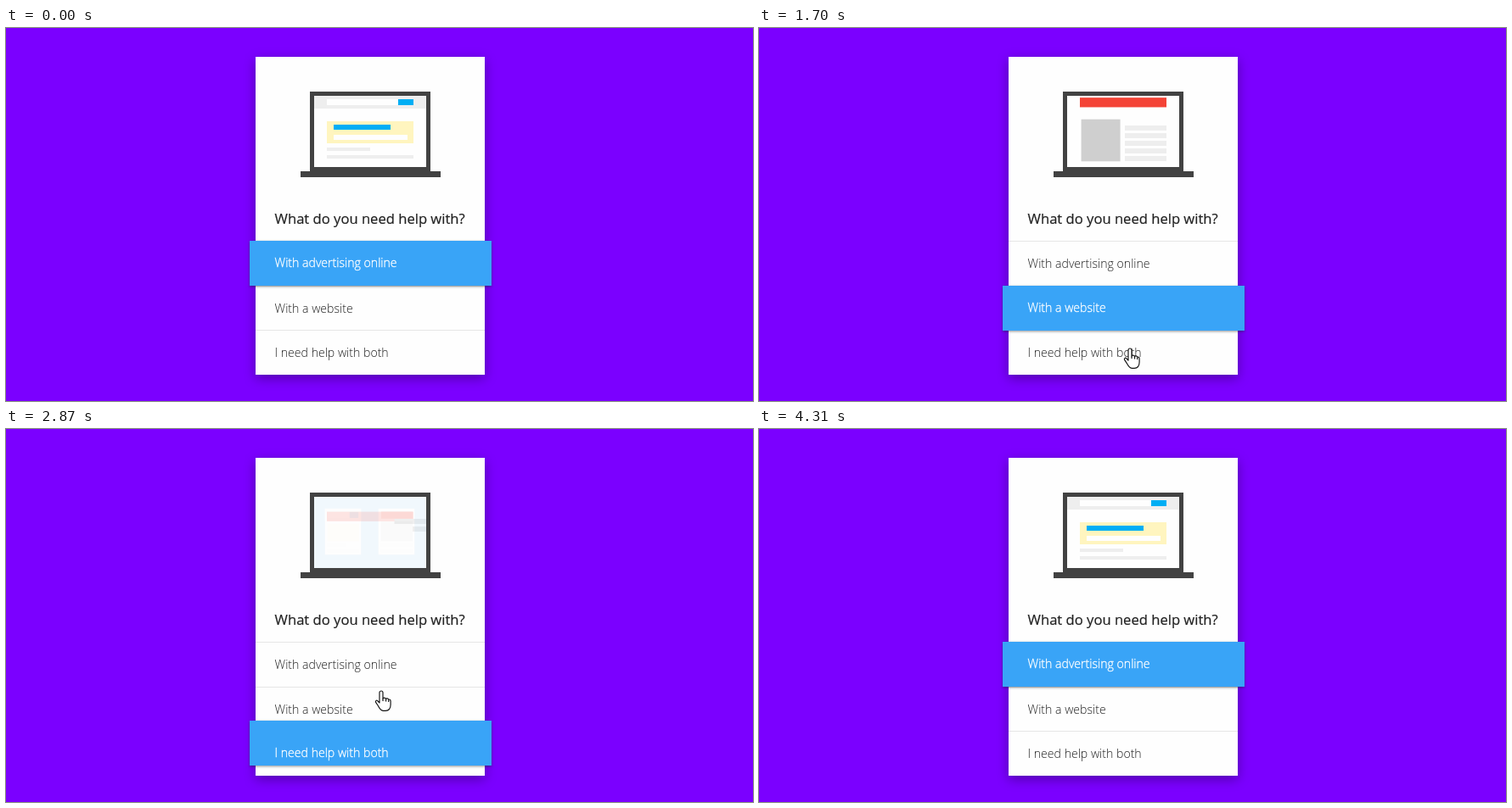
These frames come from a looping animation (880x440 px, 4960 ms). An HTML page:

```html
<!DOCTYPE html>
<html lang="en">
<head>
<meta charset="utf-8">
<title>What do you need help with?</title>
<style>
  html, body { margin: 0; width: 100%; height: 100%; overflow: hidden; background: #7b00ff; }
  svg { display: block; width: 880px; height: 440px; }
  text { font-family: "Open Sans", sans-serif; }
  .title { font-size: 16.6px; fill: #222; stroke: #222; stroke-width: .2; }
  .label { font-size: 14.1px; font-weight: 300; }
  .card { filter: drop-shadow(0 4px 7px rgba(0, 0, 0, .34)); }
  .mark { filter: drop-shadow(0 1.5px 1.5px rgba(0, 0, 0, .42)); }
</style>
</head>
<body>
<svg id="stage" viewBox="0 0 880 440">
  <defs><clipPath id="screen"><rect x="363" y="80" width="132" height="84"/></clipPath></defs>
  <rect width="880" height="440" fill="#7b00ff"/>
  <rect class="card" x="294" y="34" width="270" height="375" fill="#fefefe"/>
  <path d="M358 75h142v94h12v7H347v-7h11z" fill="#424242"/>
  <rect x="363" y="80" width="132" height="84" fill="#fefefe"/>
  <g id="view" clip-path="url(#screen)"></g>
  <text class="title" x="316.6" y="231">What do you need help with?</text>
  <path d="M294 251.5h270M294 304.5h270M294 356.5h270" stroke="#e6e6e6"/>
  <rect id="mark" class="mark" x="287" width="285" height="53" fill="#39a4f7"/>
  <g id="labels"></g>
  <g id="hand" stroke="#111" stroke-width="1.15" stroke-linejoin="round">
    <path fill="#fff" d="M-2 2a2 2 0 0 1 4 0V9c.4-1.4 3.4-1.2 3.6.6c.5-1.2 3-1 3.1.9c.8-1 2.4-.4 2.4 1.4V16c0 4.4-2.3 7.3-6 7.3H2.2c-3 0-4.4-2.8-6-6L-6.4 13.4c-.8-1.8 1-3 2.3-1.6L-2 14z"/>
    <path fill="none" d="M2 9v3M5.6 10v2.5M8.7 11v2"/>
  </g>
</svg>
<script>
const LOOP = 4960;
const GRAY = '#eee', BLUE = '#00aef4', RED = '#f44336', YELLOW = '#fff5bf', WHITE = '#fefefe';
const $ = id => document.getElementById(id);

function el(parent, tag, attrs) {
  const node = document.createElementNS('http://www.w3.org/2000/svg', tag);
  for (const k in attrs) node.setAttribute(k, attrs[k]);
  return parent.appendChild(node);
}
const group = parent => el(parent, 'g', {});
// Box given by its left, top, right and bottom edges.
const box = (parent, fill, l, t, r, b) =>
  el(parent, 'rect', { x: l, y: t, width: r - l, height: b - t, fill });
const clamp = v => Math.max(0, Math.min(1, v));
const span = (t, start, dur) => clamp((t - start) / dur);
const rest = u => (1 - u) ** 3;
const backOut = u => 1 + 2.70158 * (u - 1) ** 3 + 1.70158 * (u - 1) ** 2;
const smooth = u => u * u * (3 - 2 * u);
const move = (g, x, y) => g.setAttribute('transform', `translate(${x.toFixed(2)} ${y.toFixed(2)})`);
const zoom = (g, x, y, s) =>
  g.setAttribute('transform', `translate(${x} ${y}) scale(${s.toFixed(4)}) translate(${-x} ${-y})`);
const fade = (g, a) => g.setAttribute('opacity', clamp(a).toFixed(3));

// Advertising page
const ad = group($('view'));
const adHead = group(ad), adBox = group(ad), adLines = group(ad);
box(adHead, GRAY, 363, 80, 495, 95);
box(adHead, WHITE, 378, 84, 462, 91);
box(adHead, BLUE, 462, 84, 480, 91);
box(adBox, YELLOW, 378, 110, 480, 136);
box(adBox, BLUE, 386, 114, 453, 120);
box(adBox, WHITE, 386, 126, 473, 132);
box(adLines, GRAY, 378, 141, 429, 145);
box(adLines, GRAY, 378, 150, 480, 154);

// Website page
const site = group($('view'));
const siteHead = box(site, RED, 378, 83, 480, 94.3);
const sitePic = box(site, '#cfcfcf', 379.6, 107.7, 425.6, 157.3);
const siteBars = [0, 1, 2, 3, 4, 5].map(i => box(site, GRAY, 431, 106 + 9 * i, 480, 112 + 9 * i));

// Both pages
const both = group($('view'));
box(both, '#39a4f7', 363, 80, 495, 164);
const panels = [group(both), group(both)];
[370, 433].forEach((x, i) => {
  const p = panels[i];
  box(p, WHITE, x, 87, x + 54, 156);
  box(p, GRAY, x + 4, 139, x + (i ? 51 : 31), 144);
  box(p, GRAY, x + 4, 147, x + 51, 152);
  box(p, i ? '#c6c6c6' : YELLOW, x + 4, i ? 106 : 110, x + 51, 136);
});
box(panels[0], GRAY, 370, 87, 424, 105);
box(panels[0], WHITE, 374, 92, 407, 101);
box(panels[0], BLUE, 407, 92, 420, 101);
box(panels[1], RED, 437, 91, 484, 102);

const rows = [251, 304, 356];
const labels = ['With advertising online', 'With a website', 'I need help with both'].map(s => {
  const node = el($('labels'), 'text', { class: 'label', x: 316.6 });
  node.textContent = s;
  return node;
});

const OUT = 195;
function drawAd(t) {
  const inAt = t < 2000 ? -2000 : 3116;
  const out = t < 2000 ? span(t, 620, OUT) : 0;
  fade(ad, t < inAt ? 0 : 1 - out * out);
  move(ad, 0, -15 * out);
  move(adHead, 0, 30 * rest(span(t, inAt + 20, 380)));
  fade(adHead, span(t, inAt, 300));
  move(adBox, 0, 30 * rest(span(t, inAt + 40, 380)));
  fade(adBox, span(t, inAt + 40, 250));
  move(adLines, 0, 20 * rest(span(t, inAt, 260)));
  fade(adLines, span(t, inAt, 250));
}

function drawSite(t) {
  const [inAt, outAt] = t < 2400 ? [705, 1690] : [2790, 3030];
  const out = span(t, outAt, OUT);
  fade(site, t < inAt ? 0 : 1 - out * out);
  move(siteHead, 0, 30 * rest(span(t, inAt, 380)) - 15 * out);
  fade(siteHead, span(t, inAt + 60, 150));
  zoom(sitePic, 402.6, 132.5, (1 - .3 * rest(span(t, inAt + 40, 300))) * (1 - .2 * out * out));
  fade(sitePic, span(t, inAt + 80, 150));
  siteBars.forEach((bar, i) => {
    move(bar, 66 * rest(span(t, inAt + 50 * i, 310)), 0);
    fade(bar, out > .04 + .1 * i ? 0 : 1);
  });
}

function drawBoth(t) {
  const inAt = 1775, out = span(t, 2705, OUT);
  fade(both, span(t, inAt, 180) * (1 - out) ** 1.5);
  panels.forEach((p, i) => {
    const u = span(t, inAt + 60 + 60 * i, 440);
    zoom(p, i ? 460 : 397, 119.5, (.6 + .4 * backOut(u)) * (1 - .25 * out));
    fade(p, span(t, inAt + 60 + 60 * i, 140));
  });
}

// Highlight hops: start time and row step
const hops = [[759, 0, 1], [1829, 1, 2], [2844, 2, 1], [3170, 1, 0]];
function drawMenu(t) {
  let y = rows[0];
  for (const [at, from, to] of hops) {
    if (t > at) y += (rows[to] - rows[from]) * backOut(span(t, at, 512));
  }
  $('mark').setAttribute('y', y.toFixed(2));
  labels.forEach((node, i) => {
    const lit = clamp((40 - Math.abs(y - rows[i])) / 25);
    const c = Math.round(30 + 225 * lit);
    const ink = `rgb(${c},${c},${c})`;
    node.setAttribute('y', ([283, 336, 388][i] - lit).toFixed(2));
    node.setAttribute('fill', ink);
    node.setAttribute('stroke', ink);
    node.setAttribute('stroke-width', (.3 * lit).toFixed(2));
  });
}

// Pointer moves: start, end, target x, target y
const trips = [
  [490, 700, 445, 334], [1450, 1690, 437, 378], [1690, 1850, 437, 381],
  [2590, 2870, 442, 309], [3040, 3300, 441.5, 286],
  [3690, 3900, 692, 357], [4100, 4250, 747, 373]
];
function drawHand(t) {
  let x = 449, y = 407;
  for (const [a, b, tx, ty] of trips) {
    const u = smooth(span(t, a, b - a));
    x += (tx - x) * u;
    y += (ty - y) * u;
  }
  move($('hand'), x, y);
  fade($('hand'), span(t, 460, 60) * (1 - span(t, 4190, 110)));
}

function draw(t) {
  drawAd(t);
  drawSite(t);
  drawBoth(t);
  drawMenu(t);
  drawHand(t);
}

const start = performance.now();
function tick() {
  draw((performance.now() - start) % LOOP);
  requestAnimationFrame(tick);
}
tick();
</script>
</body>
</html>
```
